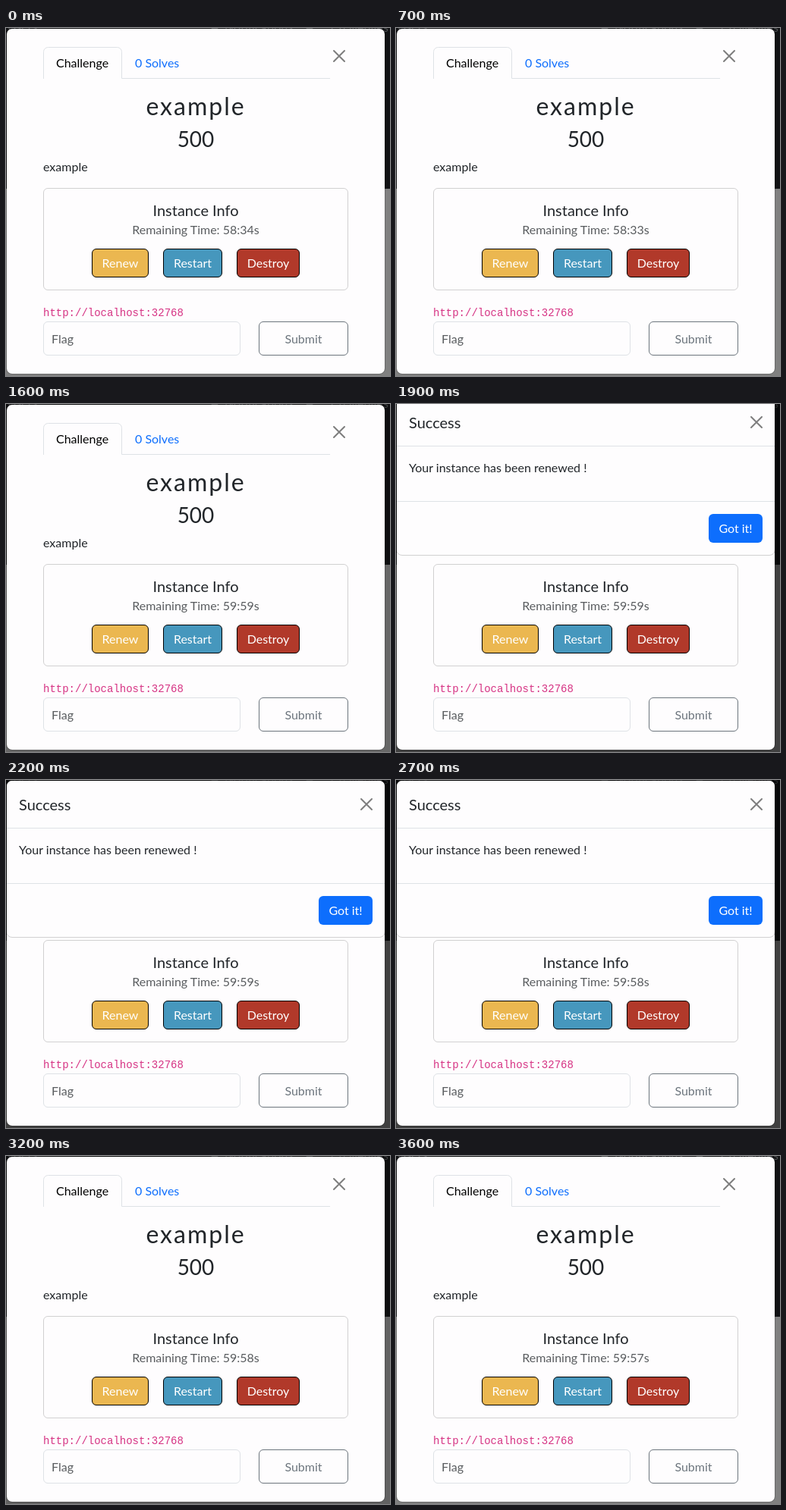
An HTML page that plays this animation: 506x459 px, repeating every 3.9 s.

```html
<!DOCTYPE html>
<html lang="en">
<head>
<meta charset="utf-8">
<title>Instance renewal</title>
<style>
  html, body { margin: 0; width: 100%; height: 100%; overflow: hidden; background: #808080; }
  svg { display: block; width: 506px; height: 459px; font: 16px Lato, sans-serif; fill: #212529; }
  .mid { text-anchor: middle; }
  .h4 { font-size: 20px; }
  .muted { fill: #595c5f; }
  .white { fill: #fff; }
  .paper { fill: #fefdfe; }
  .edge { fill: none; stroke: #000; stroke-opacity: .175; }
  .rule { fill: none; stroke: #dee2e6; }
  .close { fill: none; stroke: #000; stroke-opacity: .5; stroke-width: 2; stroke-linecap: round; }
  .nav { fill: #505254; }
</style>
</head>
<body>
<svg viewBox="0 0 506 459">
  <!-- Page behind the dialogs -->
  <rect width="506" height="459" fill="#808080"/>
  <rect width="506" height="212" fill="#111214"/>
  <g class="nav">
    <text x="2" y="4">Users</text>
    <circle cx="275" cy="-2" r="5"/>
    <text x="288" y="4">Notifications</text>
    <circle cx="400" cy="-2" r="5"/>
    <text x="504" y="5" text-anchor="end">Challenges</text>
  </g>
  <rect id="backdrop" width="506" height="459" fill="#000" opacity="0"/>

  <!-- Challenge dialog -->
  <rect class="paper" x="1" y="1" width="498" height="455" rx="7"/>
  <rect class="edge" x=".5" y=".5" width="499" height="456" rx="7.5"/>
  <path class="rule" d="M49.5 67V31.5a6 6 0 0 1 6-6H146.5a6 6 0 0 1 6 6V66.5H427"/>
  <text x="66" y="52" fill="#000">Challenge</text>
  <text x="170" y="52" fill="#0d6efd">0 Solves</text>
  <path class="close" d="M432 30l14 14m0-14l-14 14"/>
  <text class="mid" x="250" y="115" font-size="32" letter-spacing="2">example</text>
  <text class="mid" x="250" y="157" font-size="28">500</text>
  <text x="49" y="189">example</text>

  <rect class="edge" x="49.5" y="211.5" width="401" height="134" rx="5.5"/>
  <text class="mid h4" x="250" y="248">Instance Info</text>
  <text class="mid muted" id="remaining" x="250" y="272"></text>
  <g stroke="#000">
    <rect x="113.5" y="291.5" width="74" height="37" rx="5.5" fill="#ebb750"/>
    <rect x="207.5" y="291.5" width="77" height="37" rx="5.5" fill="#4697bd"/>
    <rect x="304.5" y="291.5" width="82" height="37" rx="5.5" fill="#b1392a"/>
  </g>
  <g class="mid white">
    <text x="150.5" y="316">Renew</text>
    <text x="246" y="316">Restart</text>
    <text x="345.5" y="316">Destroy</text>
  </g>

  <text x="49" y="380" font-size="14" fill="#d63384" font-family="Liberation Mono, monospace">http://localhost:32768</text>
  <rect class="rule" x="49.5" y="387.5" width="259" height="44" rx="5.5"/>
  <text class="muted" x="60" y="416">Flag</text>
  <rect x="333.5" y="387.5" width="117" height="44" rx="5.5" fill="none" stroke="#6c757d"/>
  <text class="mid" x="392" y="416" fill="#6c757d">Submit</text>

  <!-- Success dialog -->
  <g id="success" opacity="0">
    <rect class="paper" x="1" y="1" width="498" height="206" rx="7"/>
    <rect class="edge" x=".5" y=".5" width="499" height="207" rx="7.5"/>
    <path class="rule" d="M1 63.5H499M1 136.5H499"/>
    <text class="h4" x="17" y="40">Success</text>
    <path class="close" d="M468 25l14 14m0-14l-14 14"/>
    <text x="17" y="98">Your instance has been renewed !</text>
    <rect x="412" y="153" width="71" height="38" rx="6" fill="#0d6efd"/>
    <text class="mid white" x="447.5" y="178">Got it!</text>
  </g>
</svg>
<script>
  const LOOP = 3900, STEP = 100, FADE = 150, SLIDE = 300;
  const BACKDROP_IN = 1540, DIALOG_IN = 1700, DIALOG_OUT = 2968, BACKDROP_OUT = 3120;
  const clock = [[0, '58:34'], [300, '58:33'], [1300, '58:32'],
                 [1500, '59:59'], [2600, '59:58'], [3600, '59:57']];
  const [backdrop, success, remaining] =
    ['backdrop', 'success', 'remaining'].map(id => document.getElementById(id));

  const progress = (t, start, length) => Math.min(1, Math.max(0, (t - start) / length));

  // cubic-bezier(0, 0, .58, 1), solved by bisection
  function easeOut(x) {
    const curve = (u, p) => 3 * (1 - u) * u * u * p + u ** 3;
    let low = 0, high = 1;
    for (let i = 0; i < 20; i++) {
      const u = (low + high) / 2;
      if (curve(u, .58) < x) low = u; else high = u;
    }
    return curve(high, 1);
  }

  function draw(t) {
    const dim = progress(t, BACKDROP_IN, FADE) - progress(t, BACKDROP_OUT, FADE);
    const shown = progress(t, DIALOG_IN, FADE) - progress(t, DIALOG_OUT, FADE);
    const rest = easeOut(progress(t, DIALOG_IN, SLIDE)) - easeOut(progress(t, DIALOG_OUT, SLIDE));
    backdrop.setAttribute('opacity', dim / 2);
    success.setAttribute('opacity', shown);
    success.setAttribute('transform', `translate(0 ${Math.round(50 * (rest - 1))})`);
    const label = `Remaining Time: ${clock.findLast(([start]) => t >= start)[1]}s`;
    if (remaining.textContent !== label) remaining.textContent = label;
  }

  const origin = performance.now();
  function tick() {
    const t = (performance.now() - origin) % LOOP;
    draw(Math.floor(t / STEP) * STEP);
    requestAnimationFrame(tick);
  }
  tick();
</script>
</body>
</html>
```
